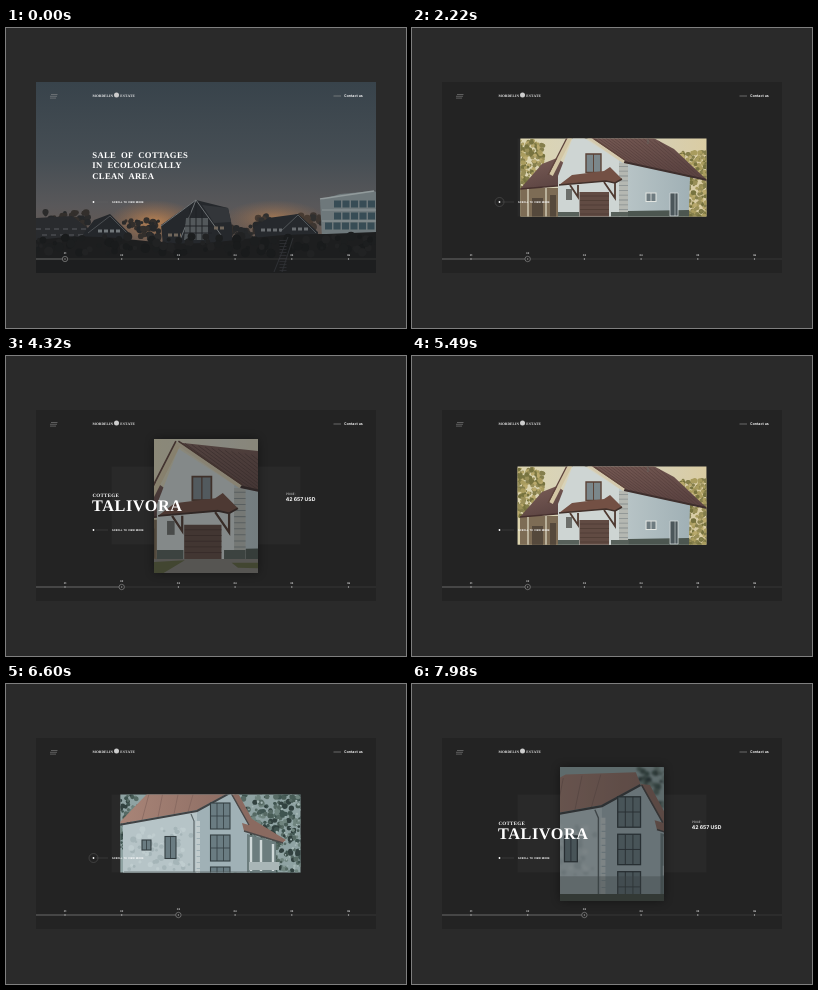
Animation of 400x300 px, one loop 8 s. Source, as an HTML page:

```html
<!DOCTYPE html>
<html lang="en">
<head>
<meta charset="utf-8">
<title>Cottages</title>
<style>
html, body { margin: 0; width: 100%; height: 100%; overflow: hidden; background: #2a2a2a; }
svg { display: block; width: 100vw; height: 100vh; }
text { fill: #fff; white-space: pre; text-rendering: geometricPrecision; }
.serif { font-family: "Liberation Serif", "Noto Serif", serif; font-weight: 700; }
.sans { font-family: Inter, Roboto, sans-serif; }
</style>
</head>
<body>
<svg viewBox="0 0 400 300">
  <defs>
    <linearGradient id="dusk" x2="0" y2="1">
      <stop offset="0" stop-color="#38434b"/><stop offset=".4" stop-color="#464e54"/>
      <stop offset=".65" stop-color="#59585a"/><stop offset=".8" stop-color="#665952"/>
    </linearGradient>
    <radialGradient id="glow">
      <stop offset="0" stop-color="#c98a52" stop-opacity=".85"/><stop offset="1" stop-color="#a87048" stop-opacity="0"/>
    </radialGradient>
    <linearGradient id="warm">
      <stop offset="0" stop-color="#e0d6aa"/><stop offset=".5" stop-color="#d3d1c2"/><stop offset="1" stop-color="#dccb9a"/>
    </linearGradient>
    <linearGradient id="tiles" x2=".5" y2="1">
      <stop offset="0" stop-color="#7c5f58"/><stop offset="1" stop-color="#5c4442"/>
    </linearGradient>
    <linearGradient id="plaster">
      <stop offset="0" stop-color="#bac6c8"/><stop offset="1" stop-color="#a0b0b5"/>
    </linearGradient>
    <linearGradient id="clay" x2="1">
      <stop offset="0" stop-color="#a98578"/><stop offset="1" stop-color="#8d6d63"/>
    </linearGradient>
    <filter id="blur" x="-30%" y="-30%" width="160%" height="160%"><feGaussianBlur stdDeviation="5"/></filter>
    <filter id="soft"><feGaussianBlur stdDeviation=".7"/></filter>
    <clipPath id="strips"></clipPath>
    <clipPath id="clip0"><rect/></clipPath>
    <clipPath id="clip1"><rect/></clipPath>
  </defs>

  <rect width="400" height="300" fill="#2a2a2a"/>
  <rect x="30" y="54" width="340" height="191" fill="#232323"/>

  <g clip-path="url(#strips)">
    <rect x="30" y="54" width="340" height="191" fill="url(#dusk)"/>
    <ellipse cx="148" cy="194" rx="46" ry="22" fill="url(#glow)"/>
    <ellipse cx="268" cy="190" rx="50" ry="18" fill="url(#glow)" opacity=".7"/>
    <g id="duskTrees" filter="url(#soft)"></g>
    <path d="M30 190L66 188L83 201V216H30Z" fill="#292b2e"/>
    <path d="M30 201H82M36 207H78" stroke="#5a5d60" stroke-width="1.2" stroke-dasharray="5 4"/>
    <path d="M78 205L88 192L104 186L124 206V216H80Z" fill="#24272b"/>
    <path d="M82 205L104 188L122 206" fill="none" stroke="#565a5e" stroke-width=".8"/>
    <path d="M92 203H114" stroke="#71777a" stroke-width="3" stroke-dasharray="4 2"/>
    <path d="M155 197L190 172L222 180L226 198V217H157Z" fill="#25282c"/>
    <path d="M155 198L190 172L215 207M190 172L174 212" fill="none" stroke="#777b7d" stroke-width=".9"/>
    <path d="M180 190H202V212H178Z" fill="#53585b"/>
    <path d="M184 180V212M190 175V212M196 182V212M178 198H206M178 205H206" stroke="#202327" stroke-width="1"/>
    <path d="M162 207H175M208 200H220" stroke="#70665b" stroke-width="3" stroke-dasharray="4 2"/>
    <path d="M196 177L222 180L225 194L208 195Z" fill="#33363a"/>
    <path d="M248 199L262 190L292 186L312 204V212H250Z" fill="#26292d"/>
    <path d="M274 204L292 187L310 205" fill="none" stroke="#5e6265" stroke-width=".8"/>
    <path d="M255 202H276M286 201H302" stroke="#696d70" stroke-width="3" stroke-dasharray="4 2"/>
    <path d="M314 172L334 166L368 163L370 164V210H316Z" fill="#6e787b"/>
    <path d="M314 171L368 163" stroke="#929b9c" stroke-width="1.5"/>
    <path d="M328 176H370M328 188H370M319 198H370" stroke="#374c55" stroke-width="7" stroke-dasharray="7 1.5"/>
    <path d="M316 182H370M316 193H370" stroke="#8d9697" stroke-width="1"/>
    <path d="M30 212Q80 205 130 212T230 212T320 206L370 204V245H30Z" fill="#1d1e1f"/>
    <g id="bushes" filter="url(#soft)"></g>
    <path d="M282 209L268 244M287 210L276 244" stroke="#34363a" stroke-width=".8"/>
    <path d="M277 212V244" stroke="#303236" stroke-width="7" stroke-dasharray=".7 2.3"/>
  </g>

  <rect id="panel" y="110.500" height="78" fill="#292929"/>

  <rect class="shade" fill="#000" filter="url(#blur)"/>
  <g clip-path="url(#clip0)">
    <g class="photo">
      <rect x="80" y="80" width="240" height="140" fill="url(#warm)"/>
      <g id="leavesA" filter="url(#soft)"></g>
      <path d="M108 160H150V205H108Z" fill="#7d6c55"/>
      <path d="M108 161L130 136L145 130L160 141L154 157Z" fill="url(#tiles)"/>
      <path d="M108 161L156 157" stroke="#46302e" stroke-width="1.5"/>
      <path d="M116 161V190M134 160V190M147 159V190" stroke="#b9b09a" stroke-width="2"/>
      <path d="M120 170H131V190H120ZM138 167H144V190H138Z" fill="#55493c"/>
      <path d="M163 104L209 134V205H146V148Z" fill="#ced5d3"/>
      <path d="M207 132L278 149L276 205H207Z" fill="url(#plaster)"/>
      <path d="M216 183L277 182V205H216Z" fill="#4c5650"/>
      <path d="M207 135H216V205H207Z" fill="#b5b8b2"/>
      <path d="M211.500 138V204" stroke="#878f8f" stroke-width="9" stroke-dasharray=".8 4"/>
      <path d="M234 165H244V173.500H234Z" fill="#6e7b80" stroke="#e3e6e2"/>
      <path d="M239 165V173" stroke="#e3e6e2" stroke-width=".8"/>
      <path d="M258 165H266V188H258Z" fill="#4b565a" stroke="#d4dadb" stroke-width=".8"/>
      <path d="M263 165V188" stroke="#d4dadb" stroke-width=".6"/>
      <path d="M163 99L236 107L262 121L295 152L212 134Z" fill="url(#tiles)"/>
      <path d="M236 107V116" stroke="#6b5d58" stroke-width="2.500"/>
      <g id="ribs" stroke="#4e3937" stroke-width=".5"></g>
      <path d="M212 134L295 152" stroke="#3e2f2d" stroke-width="2"/>
      <path d="M163 100L139 147" stroke="#d3c6a4" stroke-width="4"/>
      <path d="M163 100L212 134" stroke="#d4c9ad" stroke-width="3"/>
      <path d="M161 98L136 147M163 98L213 132" stroke="#60453d" stroke-width="1.300" fill="none"/>
      <path d="M174 126H189V144.500H174Z" fill="#7b878b" stroke="#5b4236" stroke-width="1.400"/>
      <path d="M181.500 126V144" stroke="#5b4236"/>
      <path d="M167.500 164H197V192H167.500Z" fill="#614b43"/>
      <path d="M168 168H197M168 172.500H197M168 177H197M168 181.500H197M168 186H197" stroke="#4b3832" stroke-width=".7"/>
      <path d="M147 157L160 147L192 143L198 139L210 151L203 155L194 153Z" fill="#735044"/>
      <path d="M147 157L194 153L203 155L210 151" fill="none" stroke="#42312b" stroke-width="1.500"/>
      <path d="M158 157L166 169V157M192 154L203 170V155" fill="none" stroke="#4f3a31" stroke-width="1.800"/>
      <path d="M154 161H160V172H154Z" fill="#6c6e6a"/>
      <path d="M146 184H167V192H146ZM199 184H216V192H199Z" fill="#57605a"/>
      <path d="M80 191H320V220H80Z" fill="#817e77"/>
      <path d="M80 197L168 192L130 215H80ZM205 194H320V200L210 198Z" fill="#606541"/>
    </g>
    <rect class="dim" x="80" y="70" width="240" height="160" fill="#15181a"/>
  </g>

  <rect class="shade" fill="#000" filter="url(#blur)"/>
  <g clip-path="url(#clip1)">
    <g class="photo">
      <rect x="80" y="80" width="240" height="140" fill="#8fa3a3"/>
      <g id="leavesB" filter="url(#soft)"></g>
      <path d="M117 140L192 127V210H117Z" fill="#b6c4c7"/>
      <path d="M191 127L224 109L232 112L244 138V210H191Z" fill="#a0b1b6"/>
      <g id="dapple" filter="url(#soft)" opacity=".3"></g>
      <path d="M112 140L141 110L160 100L220 98L224 108L191 126Z" fill="url(#clay)"/>
      <path d="M143 110L136 136M158 103L152 133M174 101L168 130M190 100L182 128" stroke="#7d6159" stroke-width=".6"/>
      <path d="M112 141L191 127L224 109" fill="none" stroke="#3f4244" stroke-width="2"/>
      <path d="M185 130L188 137V208" fill="none" stroke="#5b6669" stroke-width="1.200"/>
      <path d="M192 137V206" stroke="#c2cccd" stroke-width="4" stroke-dasharray="5 1"/>
      <path d="M224 108L232 109L246 135L280 156L276 159L238 147L236 139L243 141Z" fill="#8a6a60"/>
      <path d="M225 109L243 141M238 147L277 159" fill="none" stroke="#4a4848" stroke-width="1.400"/>
      <path d="M241 150L270 158V210H241Z" fill="#6c7d7e"/>
      <path d="M245 153V187M255 156V187M267 160V187" stroke="#d0d9d9" stroke-width="2.400"/>
      <path d="M243 178H273V186H243Z" fill="#a9b6b7"/>
      <g id="panes"></g>
      <path d="M118 187H243V210H118Z" fill="#52595a" opacity=".35"/>
      <path d="M118 202H320V220H118Z" fill="#475047"/>
    </g>
    <rect class="dim" x="80" y="70" width="240" height="160" fill="#15181a"/>
  </g>

  <g class="serif">
    <g id="slogan" font-size="8.7" letter-spacing=".25" word-spacing="2.600"></g>
    <text id="kind" x="86.500" y="141" font-size="5" letter-spacing=".25">COTTEGE</text>
    <g id="title" font-size="16.200" letter-spacing=".6"></g>
    <g font-size="3.600" letter-spacing=".05" fill-opacity=".9">
      <text x="86.500" y="69.300">MORDELIN</text><text x="114.300" y="69.300" letter-spacing=".2">ESTATE</text>
    </g>
  </g>
  <g id="price" class="sans">
    <text x="280" y="139.300" font-size="3" fill-opacity=".8">PRICE:</text>
    <text x="279.700" y="144.900" font-size="5.200" font-weight="700">42 657 USD</text>
  </g>
  <circle cx="110.500" cy="67" r="2.500" fill="#ccc"/>
  <path d="M45 66.500H51.500M44 68.300H51M44 70.100H50" stroke="#999" stroke-width=".5"/>
  <path d="M327.500 68H335" stroke="#999" stroke-width=".6"/>
  <text class="sans" x="338" y="69.400" font-size="3.600" font-weight="600">Contact us</text>
  <circle id="pulse" cx="87.500" cy="174" r="4.500" fill="none" stroke="#555" stroke-width=".6"/>
  <circle cx="87.500" cy="174" r=".9" fill="#fff"/>
  <path d="M90.500 174H102" stroke="#666" stroke-width=".6" stroke-dasharray="1 1"/>
  <text class="sans" x="106" y="175" font-size="2.500" font-weight="700" letter-spacing=".13">SCROLL TO VIEW MORE</text>

  <path d="M30 231H370" stroke="#4a4a4a" stroke-width=".5"/>
  <path id="bar" stroke="#969696" stroke-width=".5"/>
  <g id="stops" class="sans" font-size="2.500" font-weight="600" text-anchor="middle" fill-opacity=".85"></g>
  <circle id="ring" cy="231" r="2.700" fill="#232323" stroke="#aaa" stroke-width=".5"/>
  <circle id="core" cy="231" r=".7" fill="#999"/>
</svg>
<script>
const $ = id => document.getElementById(id);
const all = s => [...document.querySelectorAll(s)];
const clamp = v => Math.min(1, Math.max(0, v));
const mix = (a, b, p) => a + (b - a) * p;
const span = (t, start, len) => clamp((t - start) / len);
const ease = (t, start, len) => {
  const p = span(t, start, len);
  return p < .5 ? 4 * p ** 3 : 1 - 4 * (1 - p) ** 3;
};
const easeOut = (t, start, len) => 1 - (1 - span(t, start, len)) ** 3;

function add(parent, tag, attrs, text) {
  const el = document.createElementNS("http://www.w3.org/2000/svg", tag);
  set(el, attrs);
  if (text) el.textContent = text;
  return parent.appendChild(el);
}
function set(el, attrs) {
  for (const k in attrs) el.setAttribute(k, attrs[k]);
}

let seed = 7;
const rnd = () => (seed = seed * 16807 % 2147483647) / 2147483647;
function leaves(id, n, x, y, w, h, r, colors) {
  for (let i = 0; i < n; i++) add($(id), "circle", {
    cx: x + rnd() * w, cy: y + rnd() * h, r: r * (.4 + rnd() * .6),
    fill: colors[Math.floor(rnd() * colors.length)]
  });
}
const dark = ["#2b2b2b", "#332f2c", "#26282a"];
leaves("duskTrees", 60, 36, 184, 46, 24, 4, dark);
leaves("duskTrees", 45, 118, 192, 36, 20, 3.5, dark);
leaves("duskTrees", 60, 250, 187, 66, 18, 4, ["#3d3631", "#30302f", "#473b32"]);
leaves("duskTrees", 30, 222, 197, 34, 14, 4, dark);
leaves("bushes", 110, 30, 208, 340, 18, 5, ["#1c1e1f", "#212223", "#191b1c"]);
const olive = ["#998f58", "#a99c5e", "#857f4c", "#b9a96c", "#77733f"];
leaves("leavesA", 220, 102, 112, 30, 50, 2.6, olive);
leaves("leavesA", 260, 268, 124, 32, 66, 2.6, olive);
const pine = ["#3f5450", "#566a64", "#31413f", "#6f847e", "#485c56"];
leaves("leavesB", 520, 222, 92, 78, 112, 3, pine);
leaves("leavesB", 80, 240, 96, 60, 90, 1.3, ["#a4b7b5"]);
leaves("leavesB", 130, 105, 105, 28, 60, 2.6, pine);
leaves("dapple", 70, 122, 144, 64, 42, 3, ["#7f9295", "#d5e0e2"]);

for (let i = 1; i < 17; i++) {
  const p = i / 17;
  add($("ribs"), "path", { d: `M${mix(163, 252, p)} ${mix(99, 114, p)}L${mix(212, 295, p)} ${mix(134, 152, p)}` });
}

function pane(x, y, w, h, cols, rows) {
  add($("panes"), "rect", { x, y, width: w, height: h, fill: "#6a7c82", stroke: "#343e42", "stroke-width": 1.1 });
  let d = "";
  for (let i = 1; i < cols; i++) d += `M${x + w * i / cols} ${y}v${h}`;
  for (let i = 1; i < rows; i++) d += `M${x} ${y + h * i / rows}h${w}`;
  add($("panes"), "path", { d, stroke: "#343e42", "stroke-width": .8 });
}
for (const y of [119, 151, 183]) pane(204.5, y, 19.5, 26, 3, 2);
pane(159, 152.5, 11, 22, 2, 1);
pane(136, 156, 9, 10, 2, 1);

// capitals mark the letters that fade late
const slogan = ["sAle of CoTtAgeS", "in EcoLoGically", "CLeAN ArEa"].flatMap((line, row) => {
  const text = add($("slogan"), "text", { x: 86.3, y: 129.6 + row * 10.7 });
  return [...line].map(c => ({
    el: add(text, "tspan", {}, c.toUpperCase()),
    start: c === c.toUpperCase() ? 440 + rnd() * 120 : 120 + rnd() * 200
  }));
});
const titleText = add($("title"), "text", { x: 86, y: 155 });
const title = [..."TALIVORA"].map(c => add(titleText, "tspan", {}, c));

const stopX = i => 59 + i * 56.7;
const labels = [];
for (let i = 0; i < 6; i++) {
  add($("stops"), "circle", { cx: stopX(i), cy: 231, r: .7, fill: "#ccc" });
  labels.push(add($("stops"), "text", { x: stopX(i) }, "0" + (i + 1)));
}

const STRIP = 340 / 6;
const strips = Array.from({ length: 6 }, (_, i) =>
  add($("strips"), "rect", { x: 30 + i * STRIP, y: 54, height: 191 }));

const LEFT = 105.5, RIGHT = 294.5, WIDE = RIGHT - LEFT;
const SHIFT = 4443;
// zoom: focus in the wide crop, focus in the tall crop, scale
const cards = [
  { from: [182, 135], to: [196.5, 132], zoom: 1.26 },
  { from: [215, 132], to: [218, 128], zoom: 1.17 }
];
const clips = all("clipPath[id^=clip] rect"), photos = all(".photo"), dims = all(".dim"), shades = all(".shade");

function drawCard(i, t) {
  const c = cards[i];
  const m = ease(t, 2210, 880) - ease(t, 4350, 1230);
  const x = mix(RIGHT - WIDE * ease(t, 1470, 890), 148, m);
  const r = mix(RIGHT - WIDE * ease(t, 5530, 600), 252, m);
  const y = mix(110.6, 83, m), b = mix(188.6, 217, m);
  const box = { x, y, width: Math.max(0, r - x), height: b - y };
  set(clips[i], box);
  set(shades[i], { ...box, opacity: .4 * m });
  set(dims[i], { opacity: .4 * m });
  const s = mix(1, c.zoom, m) + .000008 * (t - 3500) * m;
  const fx = mix(c.from[0], c.to[0], m), fy = mix(c.from[1], c.to[1], m);
  set(photos[i], { transform: `translate(${fx} ${fy}) scale(${s}) translate(${-c.from[0]} ${-c.from[1]})` });
}

function draw(t) {
  strips.forEach((el, i) => set(el, { width: STRIP * (1 - ease(t, i * 45, 820)) }));
  slogan.forEach(l => set(l.el, { "fill-opacity": 1 - span(t, l.start, 540) }));

  const w = WIDE * ease(t, 1470, 650);
  set($("panel"), { x: RIGHT - w, width: w });
  drawCard(0, t);
  drawCard(1, t - SHIFT);

  const u = t < 5900 ? t : t - SHIFT;
  const show = (on, off) => span(u, on, 430) * (1 - span(u, off, 350));
  title.forEach((el, i) => set(el, { "fill-opacity": show(2640 + i * 60, 4500 + i * 40) }));
  set($("kind"), { opacity: show(2630, 4500) });
  set($("price"), { opacity: show(2800, 4550) });
  set($("pulse"), { opacity: show(1750, 2250) });

  const at = easeOut(t, 60, 900) + easeOut(t, 5550, 900);
  const x = stopX(at);
  set($("bar"), { d: `M30 231H${x}` });
  set($("ring"), { cx: x });
  set($("core"), { cx: x });
  labels.forEach((el, i) => set(el, { y: 228 - 1.8 * clamp(1 - Math.abs(at - i)) }));
}

const begin = performance.now();
function tick() {
  draw((performance.now() - begin) % 8000);
  requestAnimationFrame(tick);
}
tick();
</script>
</body>
</html>
```
